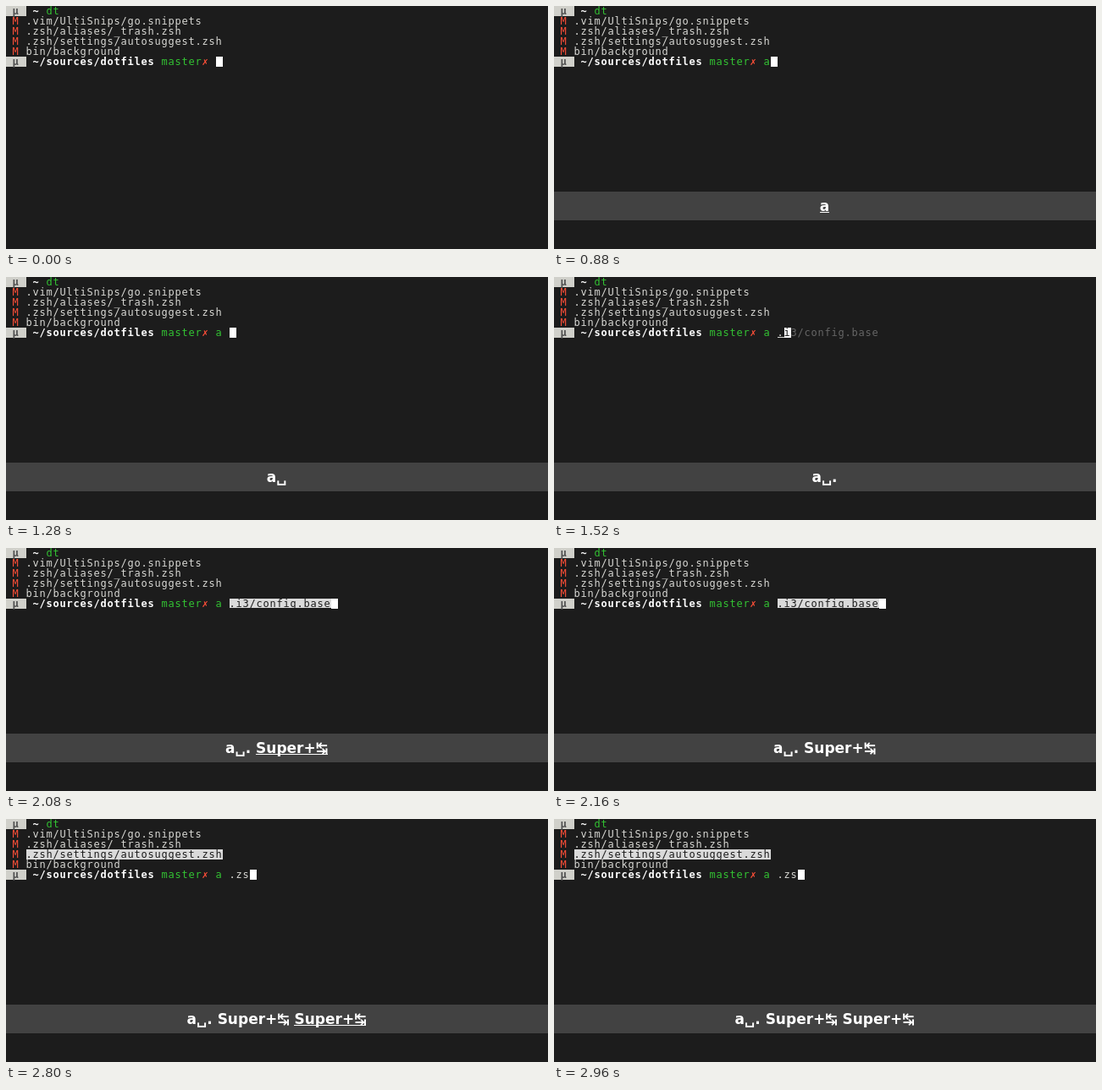
An HTML page for the animation above (3280 ms loop, 640 px wide and 288 px high).

```html
<!DOCTYPE html>
<html lang="en">
<head>
<meta charset="utf-8">
<title>Terminal completion</title>
<style>
  html, body { margin: 0; width: 100%; height: 100%; overflow: hidden; background: #1c1c1c; }
  svg { display: block; width: 640px; height: 288px; }
  .term { font: 12px "DejaVu Sans Mono", "Liberation Mono", monospace; }
  .bold { font-weight: bold; }
  .keys { font: bold 17px "DejaVu Sans", sans-serif; text-anchor: middle; }
</style>
</head>
<body>
<svg viewBox="0 0 640 288">
  <rect width="640" height="288" fill="#1c1c1c"/>
  <g id="screen" class="term"></g>
  <g id="overlay"></g>
</svg>
<script>
const LOOP = 3280, CELL = 8, ROW = 12, BEARING = -0.5;
const C = { text: '#d8d8d4', white: '#ffffff', bg: '#1c1c1c', label: '#d0d0ca', mu: '#4e4e4e',
            red: '#ff4f38', green: '#33c433', ghost: '#666666', select: '#dadada', bar: '#424242' };
const screen = document.getElementById('screen');
const overlay = document.getElementById('overlay');

// Each entry: start time, command line state
const lines = [
  [0,    { cursor: 31 }],
  [880,  { cmd: 'a', cursor: 32 }],
  [1120, { cmd: 'a', cursor: 33 }],
  [1360, { cmd: 'a', arg: '.', ghost: 'i3/config.base', underline: true, cursor: 34 }],
  [2080, { cmd: 'a', arg: '.i3/config.base', selected: true, underline: true, cursor: 48 }],
  [2800, { cmd: 'a', arg: '.zs', picked: true, cursor: 36 }]
];

// Each entry: start time, pressed keys, length of the underlined tail
const presses = [
  [0, '', 0],
  [880, 'a', 1], [1040, 'a', 0],
  [1120, 'a␣', 1], [1280, 'a␣', 0],
  [1360, 'a␣.', 1], [1520, 'a␣.', 0],
  [2000, 'a␣. Super+↹', 7], [2160, 'a␣. Super+↹', 0],
  [2800, 'a␣. Super+↹ Super+↹', 7], [2960, 'a␣. Super+↹ Super+↹', 0]
];

function add(parent, name, attrs, content = '') {
  const node = document.createElementNS('http://www.w3.org/2000/svg', name);
  for (const key in attrs) node.setAttribute(key, attrs[key]);
  node.textContent = content;
  return parent.appendChild(node);
}

function rect(parent, x, y, width, height, fill) {
  add(parent, 'rect', { x, y, width, height, fill });
}

function block(col, row, count, fill) {
  rect(screen, col * CELL, row * ROW, count * CELL, ROW, fill);
}

function print(col, row, str, fill, cls = '') {
  const x = [...str].map((_, i) => (col + i) * CELL + BEARING).join(' ');
  add(screen, 'text', { x, y: row * ROW + 10, fill, class: cls }, str);
}

function prompt(row, path) {
  block(0, row, 3, C.label);
  print(1, row, 'µ', C.mu, 'bold');
  print(4, row, path, C.white, 'bold');
}

function drawScreen({ cmd = '', arg = '', ghost = '', underline, selected, picked, cursor }) {
  screen.replaceChildren();
  prompt(0, '~');
  print(6, 0, 'dt', C.green);
  const files = ['.vim/UltiSnips/go.snippets', '.zsh/aliases/_trash.zsh',
                 '.zsh/settings/autosuggest.zsh', 'bin/background'];
  files.forEach((file, i) => {
    const hit = picked && i === 2;
    if (hit) block(3, i + 1, file.length, C.select);
    print(1, i + 1, 'M', C.red);
    print(3, i + 1, file, hit ? C.bg : C.text);
  });

  prompt(5, '~/sources/dotfiles');
  print(23, 5, 'master', C.green);
  print(29, 5, '✗', C.red, 'bold');
  print(31, 5, cmd, C.green);
  if (selected) block(33, 5, arg.length, C.select);
  const ink = selected ? C.bg : C.text;
  print(33, 5, arg, ink);
  if (underline) rect(screen, 33 * CELL, 71, arg.length * CELL, 1, ink);
  block(cursor, 5, 1, C.white);
  print(cursor, 5, ghost.slice(0, 1), C.bg);
  print(cursor + 1, 5, ghost.slice(1), C.ghost);
}

function drawKeys(keys, tail) {
  overlay.replaceChildren();
  if (!keys) return;
  rect(overlay, 0, 220, 640, 34, C.bar);
  const text = add(overlay, 'text', { x: 319.5, y: 243, class: 'keys', fill: C.white }, keys);
  if (!tail) return;
  const left = Math.round(text.getStartPositionOfChar(keys.length - tail).x);
  const right = Math.round(text.getEndPositionOfChar(keys.length - 1).x);
  rect(overlay, left, 244, right - left, 1, C.white);
}

const at = (steps, t) => steps.findLast(([start]) => start <= t);
let shownLine, shownPress;

function render(t) {
  const line = at(lines, t), press = at(presses, t);
  if (line !== shownLine) drawScreen((shownLine = line)[1]);
  if (press !== shownPress) drawKeys(...(shownPress = press).slice(1));
}

const begin = performance.now();
function tick() {
  render((performance.now() - begin) % LOOP);
  requestAnimationFrame(tick);
}
tick();
</script>
</body>
</html>
```
